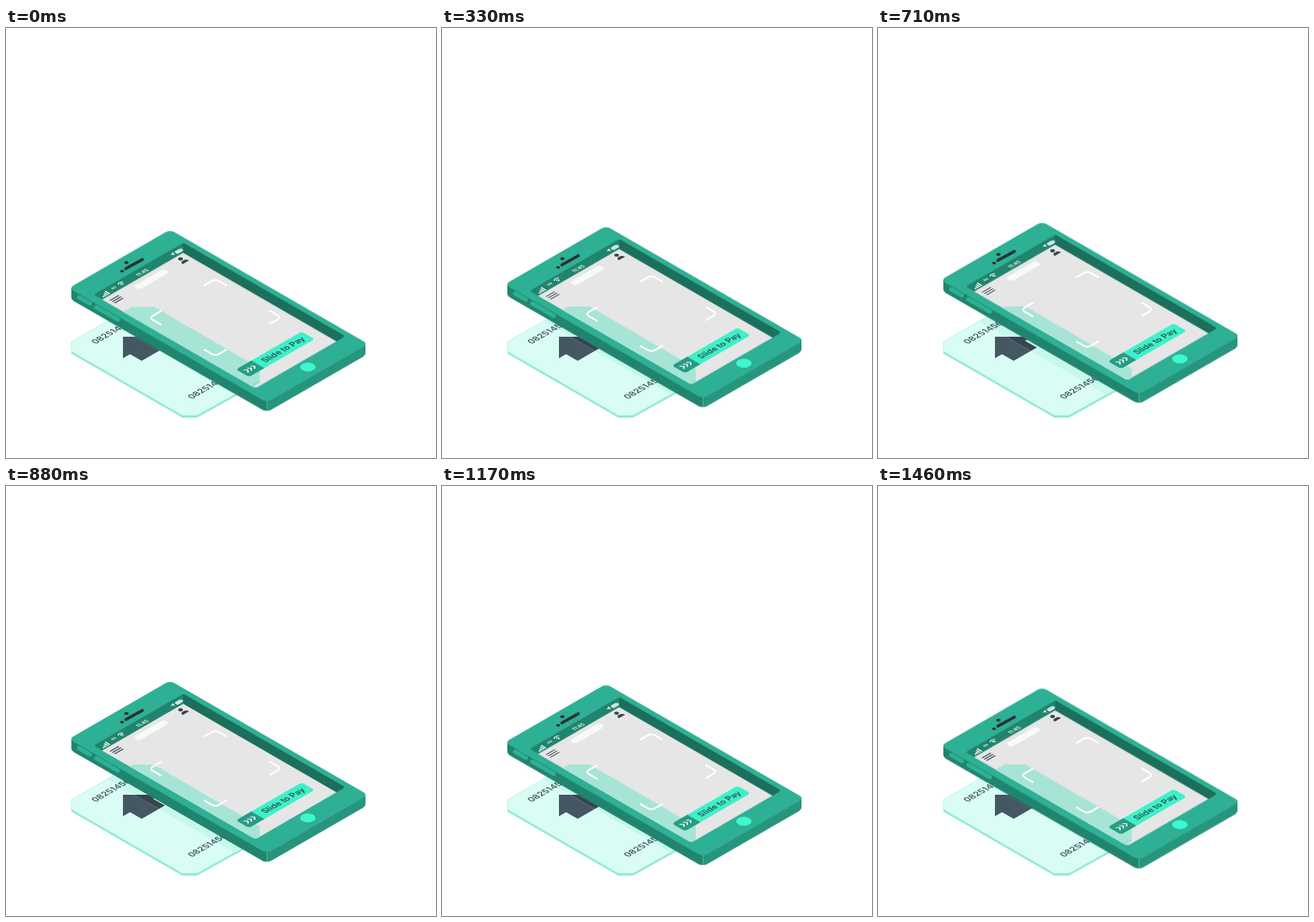
Animation, 500 px wide and 500 px high, one loop 1500 ms. Source, as an HTML page:

```html
<!DOCTYPE html>
<html lang="en">
<head>
<meta charset="utf-8">
<title>Slide to Pay</title>
<style>
  html, body { margin: 0; width: 100%; height: 100%; overflow: hidden; background: #fff; }
  svg { display: block; width: 100vw; height: 100vh; }
  text { font-family: Inter, Roboto, sans-serif; font-weight: 600; }
  .mid { text-anchor: middle; }
  .line { fill: none; stroke-linecap: round; stroke-linejoin: round; }
</style>
</head>
<body>
<svg viewBox="0 0 500 500">
  <defs>
    <clipPath id="opening"><rect data-iso="101.5 308.8" width="120.7" height="217.7" rx="3.5"/></clipPath>
    <clipPath id="floor"><rect data-iso="101.5 320.6" width="120.7" height="217.7"/></clipPath>
    <clipPath id="under"><path d="M90 324.9 L300 446 H400 V300 H90Z"/></clipPath>
    <path id="cardShape" d="M76 365 L147 324 H172 L295 395.5 V410 L222 450.5 H205 L76 376Z"/>
    <g id="marks">
      <path data-iso="136 359" d="M0 0 L25 25 H15.5 V40.7 H-15.5 V25 H-25Z"/>
      <text data-iso="101 366" y="3.6" font-size="10">08251456</text>
      <text data-iso="213 430" y="3.6" font-size="10">08251456</text>
    </g>
  </defs>

  <!-- card, with a tinted strip beside the phone -->
  <use href="#cardShape" y="2.5" fill="#8ce9d2"/>
  <use href="#cardShape" fill="#d9fdf4" stroke="#a9f1e0" stroke-width=".7"/>
  <use href="#marks" fill="#455762"/>
  <g clip-path="url(#under)">
    <use href="#cardShape" fill="#c6f8ec"/>
    <use href="#marks" fill="#36454f"/>
  </g>

  <g id="phone">
    <!-- body -->
    <path fill="#21846e" d="M76 301 V312.6 Q76 314.6 79 316.4 L299 443.2 Q301 444 303.4 444 V430Z"/>
    <path fill="#27957e" d="M303.4 430 V444 Q306 444 308 443.1 L415 381.3 Q418 379.4 418 377.1 V365Z"/>
    <rect data-iso="73 301.2" width="136" height="266" rx="6" fill="#2eb094"/>
    <g class="line" stroke="#2eb094" stroke-width="5">
      <path d="M85 312 L97.5 319.2"/>
      <path d="M105 323.5 L130 337.9"/>
    </g>

    <!-- screen -->
    <g clip-path="url(#opening)">
      <rect data-iso="101.5 308.8" width="120.7" height="217.7" fill="#20846e"/>
      <path fill="#1b6f5c" d="M206 247 L396 356.7 V372 L206 260.4Z"/>
      <g clip-path="url(#floor)">
        <rect x="90" y="240" width="320" height="200" fill="#e6e6e6"/>
        <g id="seen">
          <use href="#cardShape" y="2.5" fill="#95dccb"/>
          <use href="#cardShape" fill="#a6e4d6"/>
        </g>
      </g>
    </g>

    <!-- status bar -->
    <g fill="#fff" transform="translate(0 -.6)">
      <path data-iso="115 309" d="M-4.5 1 h1.5 v2 h-1.5z M-2 -.5 h1.5 v3.5 h-1.5z M.5 -2 h1.5 v5 h-1.5z M3 -3.5 h1.5 v6.5 h-1.5z"/>
      <text class="mid" data-iso="125 301.5" y="1.5" font-size="4.2">4G</text>
      <g data-iso="134 296.5" class="line" stroke="#fff">
        <path d="M-3 -1 Q0 -3.8 3 -1 M-1.6 .7 Q0 -.8 1.6 .7"/>
        <circle cy="2" r=".4"/>
      </g>
      <text class="mid" data-iso="158.5 283.7" y="2.1" font-size="6">11:45</text>
      <path data-iso="194 262.5" d="M2.4 -2.4 L.4 2.6 L-.2 .2 L-2.6 -.4Z"/>
      <g data-iso="201.2 258.8">
        <rect x="-4" y="-2" width="7.5" height="4" rx="1" fill="#c9e6df" stroke="#fff" stroke-width=".6"/>
        <rect x="4" y="-.8" width=".8" height="1.6"/>
      </g>
    </g>

    <!-- app header -->
    <path class="line" data-iso="128.7 314.2" stroke="#37474f" stroke-width="1.1" d="M-5.5 -3 H5.5 M-5.5 0 H5.5 M-5.5 3 H5.5"/>
    <rect data-iso="169 291" x="-20.5" y="-4" width="41" height="8" rx="4" fill="#f8f9f9"/>
    <ellipse cx="203" cy="267.3" rx="4" ry="2.8" fill="#f5f5f5"/>
    <ellipse cx="203" cy="267.3" rx="2.8" ry="1.9" fill="#37474f"/>
    <path data-iso="207.5 270.2" fill="#37474f" d="M-4.2 2 Q-4.2 -2 0 -2 Q4.2 -2 4.2 2Z"/>

    <!-- viewfinder -->
    <g class="line" stroke="#fff" stroke-width="2">
      <path d="M231 298 L239 293.3 Q243.5 290.7 248 293.3 L256 298"/>
      <path d="M231 373 L239 377.7 Q243.5 380.3 248 377.7 L256 373"/>
      <path d="M180 328 L171 333.2 Q166.5 335.8 171 338.4 L180 343.6"/>
      <path d="M307 327.8 L315.5 332.7 Q320 335.3 315.5 337.9 L307 342.8"/>
    </g>

    <!-- pay button -->
    <g data-iso="267.5 395.7">
      <rect width="88" height="17.5" rx="3.5" fill="#3ef0c8"/>
      <path fill="#299b84" d="M20.5 0 H3.5 Q0 0 0 3.5 V14 Q0 17.5 3.5 17.5 H20.5Z"/>
      <path class="line" stroke="#fff" stroke-width="1.3" d="M4.5 6 l2.6 2.8 l-2.6 2.8 M9 6 l2.6 2.8 l-2.6 2.8 M13.5 6 l2.6 2.8 l-2.6 2.8"/>
      <text class="mid" x="54.5" y="12.1" font-size="9.7" fill="#29524f">Slide to Pay</text>
    </g>

    <!-- speaker, camera, home -->
    <path class="line" stroke="#263238" stroke-width="3.4" d="M139.3 278.6 L158.6 268"/>
    <ellipse cx="140" cy="271.5" rx="2.6" ry="1.7" fill="#263238"/>
    <ellipse cx="135" cy="281.5" rx="2.3" ry="1.5" fill="#263238"/>
    <ellipse cx="351" cy="393" rx="9" ry="5.2" fill="#3ff6cd"/>
  </g>
</svg>
<script>
  // Lay flat shapes on the isometric ground plane at the given point.
  for (const el of document.querySelectorAll('[data-iso]')) {
    const [x, y] = el.dataset.iso.split(' ');
    el.setAttribute('transform', `matrix(.866 -.5 .866 .5 ${x} ${y})`);
  }

  const REST = 1.2, LIFT = 10, LOOP = 1500;
  const bob = (id, sign) => document.getElementById(id).animate(
    [REST, REST - LIFT, REST].map(y => ({ transform: `translate(0px, ${sign * y}px)` })),
    { duration: LOOP, iterations: Infinity }
  );

  // The card behind the glass stays put while the phone moves.
  const moves = [bob('phone', 1), bob('seen', -1)];
  for (const m of moves) m.startTime = document.timeline.currentTime;
</script>
</body>
</html>
```
